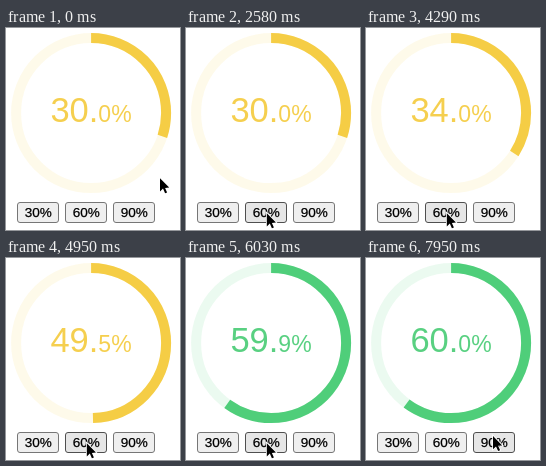
Animation, 174 px wide and 202 px high, one loop 8 s. Source, as an HTML page:

```html
<!DOCTYPE html>
<html lang="en">
<head>
<meta charset="utf-8">
<title>Progress ring</title>
<style>
  html, body { margin: 0; width: 100%; height: 100%; overflow: hidden; background: #fff; }
  svg { display: block; width: 174px; height: 202px; font-family: "Liberation Sans", Arial, sans-serif; }
  .ring { fill: none; stroke: currentColor; stroke-width: 10; }
  .track { opacity: .11; }
  #gauge { color: #f5cd45; }
  #gauge.high { color: #4fce7a; }
  #gauge text { fill: currentColor; opacity: .94; }
  .button rect { fill: #efefef; stroke: #767676; }
  .button text { font-size: 13.5px; text-anchor: middle; fill: #000; stroke: #000; stroke-width: .25; }
  .button.hover rect { fill: #e6e6e6; stroke: #4f4f4f; }
  .button.active rect { fill: #f5f5f5; stroke: #8d8d8d; }
</style>
</head>
<body>
<svg viewBox="0 0 174 202">
  <g id="gauge">
    <circle class="ring track" cx="85.1" cy="85.1" r="75"/>
    <circle class="ring" id="arc" cx="85.1" cy="85.1" r="75" transform="rotate(-90 85.1 85.1)"/>
    <text x="44.4" y="93.5" font-size="34.5"><tspan id="whole"></tspan><tspan id="rest" font-size="23"></tspan></text>
  </g>
  <g id="buttons"></g>
  <circle id="halo" r="22" fill="none" stroke="#000" stroke-opacity=".4" stroke-width="2"/>
  <path id="cursor" d="M0 0V13.2L3 10.4L5.1 15.1L7.1 14.2L5.1 9.7L9.2 9.4Z"
        fill="#000" stroke="#fff" stroke-width="1.6" paint-order="stroke"/>
</svg>
<script>
const LOOP = 8000, STEP = 30, RUN = 3600, LAG = 26;
const LENGTH = 2 * Math.PI * 75;
const $ = id => document.getElementById(id);

// Pointer stops: time, x, y
const stops = [
  [570, 154, 150.2], [630, 148.5, 151.6],
  [840, 148.5, 151.6], [930, 143.7, 153.2],
  [1920, 143.7, 153.2], [2580, 80.8, 185.2],
  [6510, 80.8, 185.2], [6870, 127, 178]
];
// Clicks: time, value before, value after
const clicks = [[2970, 30, 60], [7560, 60, 90]];

const buttons = [30, 60, 90].map((n, i) => {
  const x = 11 + i * 48;
  $("buttons").insertAdjacentHTML("beforeend",
    `<g class="button"><rect x="${x + .5}" y="174.5" width="41" height="20" rx="2.5"/>` +
    `<text x="${x + 21.3}" y="189">${n}%</text></g>`);
  return { x, el: $("buttons").lastElementChild };
});

const smooth = u => u * u * (3 - 2 * u);
const quart = u => u < .5 ? 8 * u ** 4 : 1 - 8 * (1 - u) ** 4;
const clamp = u => Math.min(1, Math.max(0, u));

function pointer(t) {
  let [, x, y] = stops[0];
  for (let i = 1; i < stops.length; i++) {
    const [t0, x0, y0] = stops[i - 1], [t1, x1, y1] = stops[i];
    if (t < t0) break;
    const k = smooth(clamp((t - t0) / (t1 - t0)));
    x = x0 + (x1 - x0) * k;
    y = y0 + (y1 - y0) * k;
  }
  return [x, y];
}

function level(t) {
  let v = clicks[0][1];
  for (const [at, from, to] of clicks)
    if (t > at + LAG) v = from + (to - from) * quart(clamp((t - at - LAG) / RUN));
  return v;
}

function draw(t) {
  const v = level(t), [x, y] = pointer(t);
  const pressed = clicks.some(([at]) => t >= at && t < at + STEP);
  const [whole, tenth] = v.toFixed(1).split(".");

  $("gauge").classList.toggle("high", v >= 50);
  $("arc").setAttribute("stroke-dasharray", `${LENGTH * v / 100} ${LENGTH}`);
  $("whole").textContent = whole + ".";
  $("rest").textContent = tenth + "%";

  for (const b of buttons) {
    const over = x >= b.x && x < b.x + 42 && y >= 174 && y < 195;
    b.el.classList.toggle("hover", over);
    b.el.classList.toggle("active", over && pressed);
  }
  const place = `translate(${x} ${y})`;
  $("cursor").setAttribute("transform", place);
  $("halo").setAttribute("transform", place);
  $("halo").style.visibility = pressed ? "visible" : "hidden";
}

const start = performance.now();
function tick() {
  const t = (performance.now() - start) % LOOP;
  draw(Math.floor(t / STEP) * STEP);
  requestAnimationFrame(tick);
}
tick();
</script>
</body>
</html>
```
